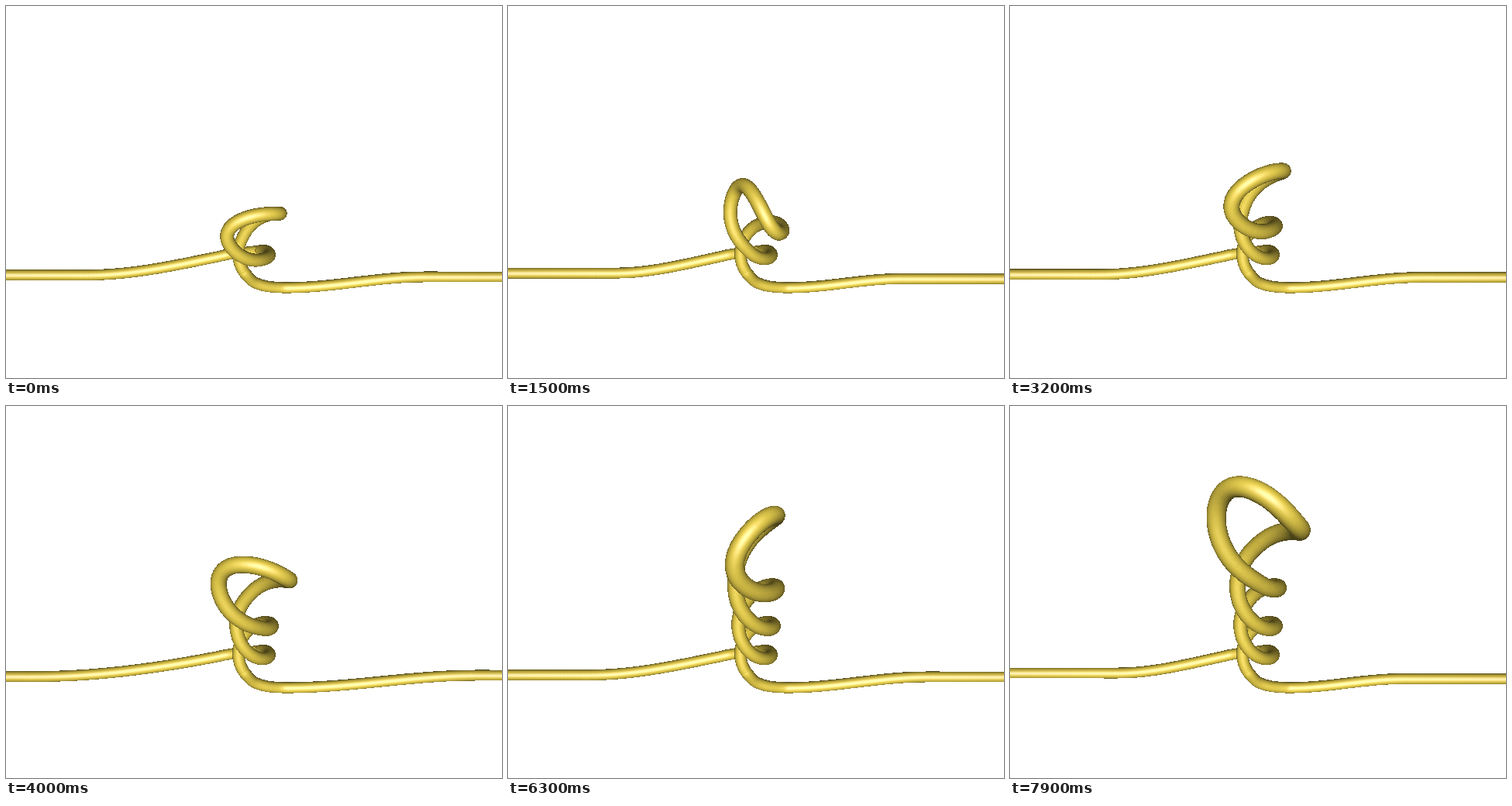
Recreate the animation shown at these times as an HTML page with a canvas. Size 640x480 px, loop 8000 ms.

```html
<!DOCTYPE html>
<html lang="en">
<head>
<meta charset="utf-8">
<title>Twisting rope</title>
<style>
html, body { margin: 0; width: 100%; height: 100%; overflow: hidden; background: #fff; }
canvas { display: block; }
</style>
</head>
<body>
<canvas id="stage" width="640" height="480"></canvas>
<script>
const W = 640, H = 480, CX = W / 2, CY = H / 2;
const LOOP = 8000, STEP = 100;
const CAM = 600;                    // camera distance, equal to the focal length
const TUBE = 7;                     // rope radius
const SIN = Math.sin(Math.PI / 3), COS = 0.5;   // lean of the coil axis to the viewer
const HALF = 76;                    // axial length of half a turn
const COIL = 18, WIDE = 30.5;       // radius of the coil and of the end loop
const TURN = 3.5;                   // seconds per half turn

const ctx = document.getElementById('stage').getContext('2d');
const image = ctx.createImageData(W, H);
const pixels = new Uint32Array(image.data.buffer);
const depth = new Float32Array(W * H);

const clamp = (v, a, b) => Math.min(b, Math.max(a, v));
const smooth = v => { v = clamp(v, 0, 1); return v * v * (3 - 2 * v); };

// Point at axial height a, at distance r from the axis in direction psi
function around(a, r, psi) {
  const w = r * Math.sin(psi);
  return [r * Math.cos(psi), -108 + a * COS + w * SIN, a * SIN - w * COS];
}

// Point that lands on screen position sx, sy at depth z
function unproject(sx, sy, z) {
  const k = (CAM - z) / CAM;
  return [(sx - CX) * k, (CY - sy) * k, z];
}

function hermite(u, y0, y1, m0, m1) {
  const u2 = u * u, u3 = u2 * u, s = 3 * u2 - 2 * u3;
  return y0 + (y1 - y0) * s + (u3 - 2 * u2 + u) * m0 + (u3 - u2) * m1;
}

function lerpKeys(keys, t) {
  let i = 1;
  while (i < keys.length - 1 && keys[i][0] < t) i++;
  const [t0, v0] = keys[i - 1], [t1, v1] = keys[i];
  return v0 + (v1 - v0) * (t - t0) / (t1 - t0);
}

const endHeight = [[0, 347], [0.7, 346], [2.4, 343], [2.8, 342.4], [3.5, 349.3],
  [4, 349], [5.2, 348], [6.3, 347], [7.9, 344.5]];

function ropePoints(t) {
  const pts = [];
  const level = lerpKeys(endHeight, t);
  const flat = 40 + 115 * Math.sqrt(Math.max(0, 349 - level) / 6);

  // left rope
  for (let x = -20; x < flat - 10; x += 20) pts.push(unproject(x, level, 0));
  const span = 290 - flat;
  for (let i = 0; i <= 10; i++) {
    const u = i / 10;
    pts.push(unproject(flat + span * u, hermite(u, level, 320, 0, -0.2 * span), 10 * u * u));
  }

  // coil and end loop: the twist fades out towards the tip
  const top = 224 + (t - 4.22) * HALF / TURN;
  const widest = top + 12, cap = 25 + 0.6 * t;
  const fade = 34, mid = 10;
  const twist = a => {
    const v = a - top - mid;
    const e = v < -fade ? v : v < fade ? -((fade - v) ** 2) / (4 * fade) : 0;
    return -Math.PI * (top + mid + e - 72) / HALF;
  };
  const strand = (a, side) => {
    const r = COIL + (WIDE - COIL) * smooth((a - top + 45) / 57);
    return around(a, r, side + twist(a));
  };
  const n = Math.ceil((widest - 40) / 6);
  for (let i = 0; i < n; i++) pts.push(strand(40 + (widest - 40) * i / n, 0));
  for (let i = 0; i <= 18; i++) {
    const b = Math.PI * i / 18, a = widest + cap * Math.sin(b);
    pts.push(around(a, WIDE * Math.cos(b), twist(a)));
  }
  for (let i = n - 1; i >= 0; i--) pts.push(strand(48 + (widest - 48) * i / n, Math.PI));

  // right rope
  pts.push(unproject(319, 355.5, 36), unproject(335, 361.3, 25));
  const far = 645 - flat, right = 696.5 - level;
  for (let i = 0; i <= 12; i++) {
    const u = i / 12;
    pts.push(unproject(355 + (far - 355) * u, hermite(u, 363.3, right, 4, 0), 14 * (1 - u) ** 2));
  }
  for (let x = far + 20; x < W + 50; x += 20) pts.push(unproject(x, right, 0));
  return pts;
}

// Yellow ramp: diffuse light along the view axis plus a pale highlight
function shade(nl, spec) {
  const d = 0.3 + 0.7 * clamp(nl, 0, 1);
  const r = Math.min(255, 246 * d + 40 * spec);
  const g = Math.min(255, 220 * d + 40 * spec);
  const b = Math.min(255, 82 * d + 100 * spec);
  return 0xff000000 | b << 16 | g << 8 | r;
}

function ball(x, y, z) {
  const s = CAM / (CAM - z), r = TUBE * s;
  const px = CX + x * s, py = CY - y * s;
  const tx = (px - CX) / CAM, ty = (py - CY) / CAM;
  const norm = 1 / Math.sqrt(1 + tx * tx + ty * ty);
  const x0 = Math.max(0, Math.ceil(px - r - 0.5)), x1 = Math.min(W - 1, Math.floor(px + r - 0.5));
  const y0 = Math.max(0, Math.ceil(py - r - 0.5)), y1 = Math.min(H - 1, Math.floor(py + r - 0.5));
  for (let j = y0; j <= y1; j++) {
    const ny = (j + 0.5 - py) / r;
    for (let i = x0; i <= x1; i++) {
      const nx = (i + 0.5 - px) / r;
      const q = 1 - nx * nx - ny * ny;
      if (q <= 0) continue;
      const nz = Math.sqrt(q), k = j * W + i, d = z + TUBE * nz;
      if (d <= depth[k]) continue;
      depth[k] = d;
      const tilt = nx * tx + ny * ty;
      const h = clamp(nz + tilt / 2, 0, 1);
      pixels[k] = shade((nz + tilt) * norm, h ** 18);
    }
  }
}

function catmull(a, b, c, d, u) {
  return b + 0.5 * u * (c - a + u * (2 * a - 5 * b + 4 * c - d + u * (3 * (b - c) + d - a)));
}

function draw(t) {
  pixels.fill(0xffffffff);
  depth.fill(-1e9);
  const p = ropePoints(t);
  for (let i = 1; i < p.length - 2; i++) {
    const [a, b, c, d] = [p[i - 1], p[i], p[i + 1], p[i + 2]];
    const n = Math.ceil(Math.hypot(c[0] - b[0], c[1] - b[1], c[2] - b[2]) / 0.4);
    for (let k = 0; k < n; k++) {
      const u = k / n;
      ball(catmull(a[0], b[0], c[0], d[0], u),
           catmull(a[1], b[1], c[1], d[1], u),
           catmull(a[2], b[2], c[2], d[2], u));
    }
  }
  ctx.putImageData(image, 0, 0);
}

const start = performance.now();
let shown = -1;
function tick() {
  const step = Math.floor(((performance.now() - start) % LOOP) / STEP);
  if (step !== shown) {
    shown = step;
    draw(step * STEP / 1000);
  }
  requestAnimationFrame(tick);
}
tick();
</script>
</body>
</html>
```
